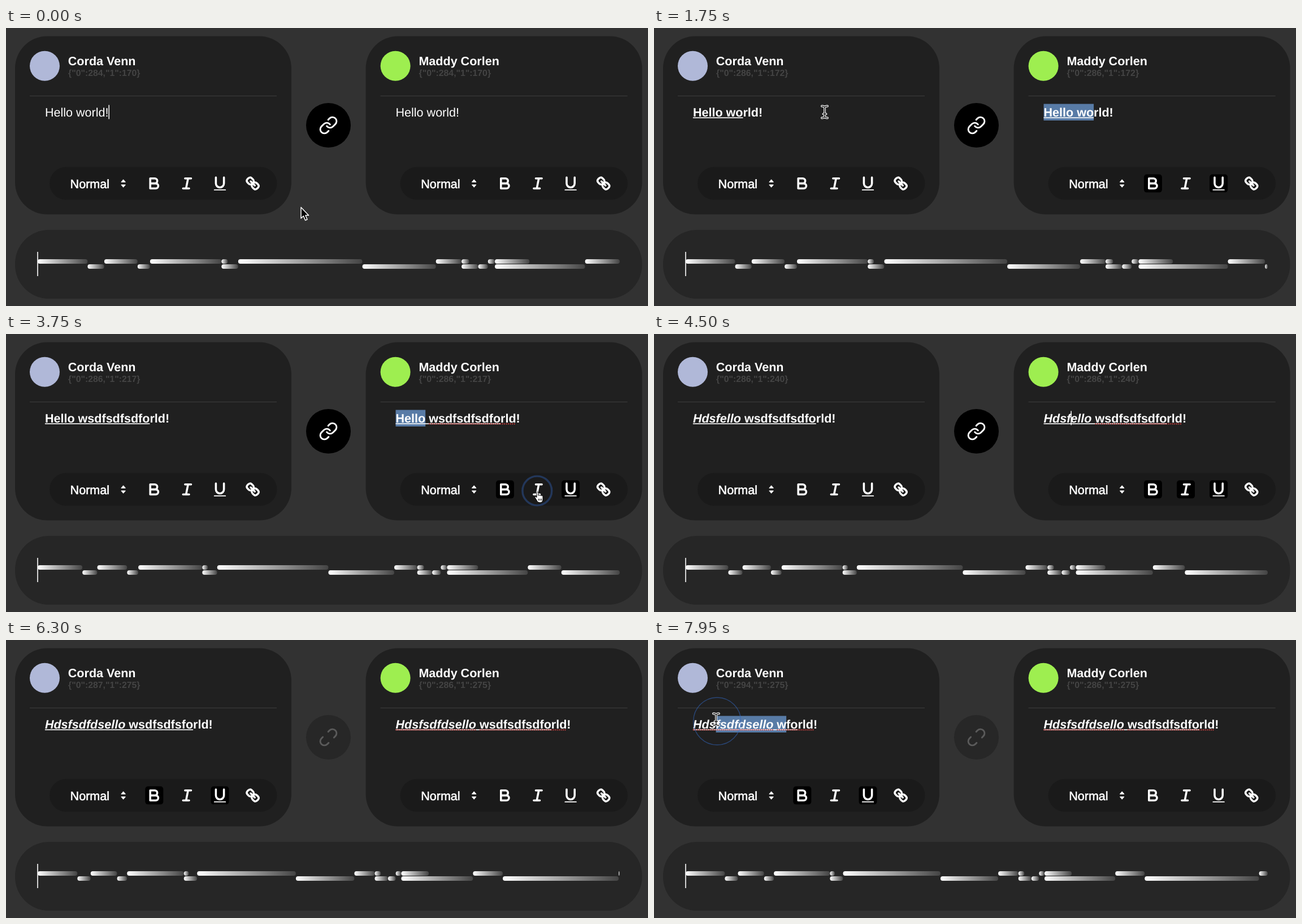
An HTML page for the animation above (8000 ms loop, 1136 by 493 pixels).

```html
<!DOCTYPE html>
<html lang="en">
<head>
<meta charset="utf-8">
<title>Linked editors</title>
<style>
  html, body { margin: 0; width: 100%; height: 100%; overflow: hidden; background: #323232; }
  svg { display: block; width: 100vw; height: 100vh; }
  text { font-family: "Liberation Sans", Arial, Helvetica, sans-serif; font-size: 21.55px; fill: #fff; text-rendering: geometricPrecision; }
  .name { font-weight: bold; }
  .clock { font-weight: bold; font-size: 15.8px; fill: #444; }
  .normal { stroke: #fff; stroke-width: .6px; }
  .icon { fill: none; stroke: #fff; stroke-width: 2; stroke-linecap: round; stroke-linejoin: round; }
  .icon .solid { fill: #fff; stroke: none; }
  .typo { stroke: #d9413f; stroke-width: 2.1; stroke-linecap: round; stroke-dasharray: 0 3.5; }
  .chain { fill: none; stroke-width: 2; stroke-linecap: round; stroke-linejoin: round; }
</style>
</head>
<body>
<svg id="stage" viewBox="0 0 1136 493">
  <defs>
    <linearGradient id="fade"><stop stop-color="#fff"/><stop offset="1" stop-color="#444"/></linearGradient>
  </defs>
  <rect width="1136" height="493" fill="#323232"/>
  <g id="editors"></g>
  <circle id="linkDisc" cx="570.5" cy="172.5" r="39.5"/>
  <g class="chain" transform="translate(570.5 172.5) scale(1.45) translate(-12 -12)">
    <path id="linked" stroke="#fff" d="M10 13a5 5 0 0 0 7.54.54l3-3a5 5 0 0 0-7.07-7.07l-1.72 1.71M14 11a5 5 0 0 0-7.54-.54l-3 3a5 5 0 0 0 7.07 7.07l1.71-1.71"/>
    <path id="unlinked" stroke="#5a5a5a" d="M18.8 12.3l1.74-1.76a5 5 0 0 0-7.07-7.07l-1.72 1.71M5.2 11.7l-1.74 1.76a5 5 0 0 0 7.07 7.07l1.72-1.71"/>
  </g>
  <rect x="16" y="358" width="1109.5" height="122" rx="60" fill="#262626"/>
  <g id="bars" fill="url(#fade)"></g>
  <rect x="55.2" y="397" width="1.6" height="43" fill="#fff"/>
  <circle id="ring" fill="none" stroke="#3267c0"/>
  <g id="cursor">
    <path id="arrow" d="M0 0V19.5L4.4 15.4 7.6 23 11 21.5 7.9 14.2H13.6Z" fill="#000" stroke="#fff" stroke-width="1.5" stroke-linejoin="round"/>
    <g id="beam" fill="none" stroke-linecap="round"></g>
    <g id="hand" stroke="#000">
      <path fill="#fff" d="M1 6.5c0-2 3-2 3 0v5c.3-1.6 2.8-1.4 2.9.2.4-1.3 2.6-1 2.7.4.6-1 2.4-.6 2.4 1v4.6c0 4-2 6.3-5 6.3-3.2 0-4.6-1.6-6-4l-3-5c-.8-1.6.9-2.6 2-1.4l1 1.3z"/>
      <path fill="none" d="M4.4 17v3.5M6.9 17v3.5M9.4 17v3.5"/>
    </g>
  </g>
</svg>
<script>
const LOOP = 8000, SIZE = 21.55, TEXT_X = 68.9, TEXT_Y = 150, RIGHT_DX = 620.6;
const MOVE = 230, PRESS = 110;
const FAMILY = '"Liberation Sans", Arial, Helvetica, sans-serif';
const LEFT = 0, RIGHT = 1;

const $ = id => document.getElementById(id);
const clamp = (v, lo, hi) => Math.min(hi, Math.max(lo, v));
const within = (v, a, b) => v >= a && v < b;
const mix = (a, b, p) => a + (b - a) * p;
const latest = (list, key, t) => list.findLast(item => item[key] <= t);
const show = (el, on) => el.setAttribute('visibility', on ? 'visible' : 'hidden');
const set = (el, attrs) => { for (const k in attrs) el.setAttribute(k, attrs[k]); };
const pen = document.createElement('canvas').getContext('2d');

// ---- Editor panels ----
const TOOLS = {
  B: '<path d="M5 4H9.5A2.5 2.5 0 0 1 9.5 9H5ZM5 9H10.5A2.5 2.5 0 0 1 10.5 14H5Z"/>',
  I: '<path d="M7 4H13M5 14H11M8 14L10 4"/>',
  U: '<path d="M5 3V9a4 4 0 0 0 8 0V3"/><rect class="solid" x="3" y="15" width="12" height="1" rx=".5"/>',
  link: '<path d="M7 7L11 11M8.9 4.577a3.476 3.476 0 0 1 .36 4.679A3.476 3.476 0 0 1 4.577 8.9C3.185 7.5 2.035 6.4 4.217 4.217S7.5 3.185 8.9 4.577ZM13.423 9.1a3.476 3.476 0 0 0-4.679-.36 3.476 3.476 0 0 0 .36 4.679c1.392 1.392 2.5 2.542 4.679.36S14.815 10.5 13.423 9.1Z"/>'
};
const toolNames = Object.keys(TOOLS);
const toolX = name => 246.3 + 58.1 * toolNames.indexOf(name);

function makeEditor(name, color, dx) {
  const g = document.createElementNS('http://www.w3.org/2000/svg', 'g');
  g.setAttribute('transform', `translate(${dx})`);
  const tools = toolNames.map(tool =>
    `<g transform="translate(${toolX(tool)} 259.6)">
      <rect class="hot" width="32" height="32" rx="5"/>
      <g class="icon" transform="scale(1.778)">${TOOLS[tool]}</g></g>`).join('');
  g.innerHTML = `
    <rect x="16" y="14.5" width="489" height="316" rx="57" fill="#202020"/>
    <circle cx="68.5" cy="67.3" r="26.5" fill="${color}"/>
    <text class="name" x="109.8" y="66">${name}</text>
    <text class="clock" x="110" y="85.3"></text>
    <rect x="42" y="120" width="437" height="1" fill="#3d3d3d"/>
    <rect x="77" y="246.5" width="402.5" height="58" rx="29" fill="#1a1a1a"/>
    <text class="normal" x="113.6" y="283.6">Normal</text>
    <path fill="#fff" stroke="#fff" stroke-linejoin="round" d="M203.8 273.2L207.6 268.8 211.4 273.2ZM203.8 278L207.6 282.4 211.4 278Z"/>
    ${tools}
    <rect class="sel" y="134.6" height="29.4" fill="#587ba6"/>
    <rect class="under" x="${TEXT_X}" y="158.4" height="1.6" fill="#fff"/>
    <text class="body" y="157"></text>
    <line class="typo" y1="159.4" y2="159.4"/><line class="typo" y1="159.4" y2="159.4"/>
    <rect class="caret" y="136.5" width="1.5" height="25" fill="#fff"/>`;
  $('editors').append(g);
  const one = c => g.querySelector('.' + c), all = c => [...g.querySelectorAll('.' + c)];
  return { dx, clock: one('clock'), hot: all('hot'), sel: one('sel'), under: one('under'),
           body: one('body'), typos: all('typo'), caret: one('caret') };
}
const editors = [makeEditor('Corda Venn', '#b0b8d8', 0), makeEditor('Maddy Corlen', '#9eee50', RIGHT_DX)];

// ---- Text: a list of { c, style }, style being letters out of B, I, U ----
function layout(doc) {
  const xs = [TEXT_X], runs = [];
  for (const { c, style } of doc) {
    let run = runs.at(-1);
    if (!run || run.style !== style) runs.push(run = { style, text: '', x: xs.at(-1) });
    run.text += c;
    pen.font = `${style.includes('I') ? 'italic ' : ''}${style.includes('B') ? 'bold ' : ''}${SIZE}px ${FAMILY}`;
    xs.push(run.x + pen.measureText(run.text).width);
  }
  return { xs, runs };
}

// ---- Session: every action adds a state; gestures move the pointer ----
// Editing turns so far, in operations: + left, - right, a pair is simultaneous
const turns = '36 -12 24 -9 51.5 4.5/-12 89.5 -53 18.5 5.5/-12 -7 5 25/-65 25'.split(' ').map(turn => {
  const sizes = turn.split('/').map(Number);
  return [Math.max(0, ...sizes), Math.max(0, ...sizes.map(n => -n))];
});
const hello = [...'Hello\u00a0world!'].map(c => ({ c, style: '' }));
let now = { t: 0, docs: [hello, hello], clocks: [[284, 170], [284, 170]], turns, linked: true,
            focus: LEFT, anchor: 12, head: 12, dragging: false, checked: [false, false], keyed: -1 };
const states = [now];
const gestures = [{ start: 0, down: 0, up: 0, from: [522, 318], to: [522, 318] }];

const commit = (t, change) => states.push(now = { ...now, t, ...change });
const setAt = (list, i, value) => list.map((old, k) => k === i ? value : old);

function gesture(t, time, from, to = from, press = true) {
  const start = Math.max(gestures.at(-1).up, t - MOVE);
  gestures.push({ start, down: t, up: t + time, from, to, press });
}
const hover = (t, x, y) => gesture(t, 0, [x, y], [x, y], false);
const textPoint = (side, i) => [layout(now.docs[side]).xs[i] + editors[side].dx, TEXT_Y];

function edit(t, change, cost, more) {
  const side = now.focus, reached = i => i === side || now.linked;
  const last = now.turns.at(-1), same = last[side] && !last[1 - side];
  const grown = [0, 0];
  grown[side] = cost + (same ? last[side] : 0);
  commit(t, {
    docs: now.docs.map((d, i) => reached(i) ? change(d) : d),
    clocks: now.clocks.map((c, i) => reached(i) ? setAt(c, side, c[side] + cost) : c),
    checked: now.checked.map((c, i) => c && (i === side || !now.linked)),
    turns: [...(same ? now.turns.slice(0, -1) : now.turns), grown],
    ...more
  });
}

function placeCaret(t, side, i) {
  gesture(t, PRESS, textPoint(side, i));
  commit(t, { focus: side, anchor: i, head: i });
}

// a high lift drags above the line, which selects back to its start
function select(t, time, side, anchor, head, lift) {
  const [x, y] = textPoint(side, head);
  gesture(t, time, textPoint(side, anchor), [x + lift * lift / 250, y - lift]);
  commit(t, { focus: side, anchor, head: anchor, dragging: true, checked: setAt(now.checked, side, true) });
  commit(t + time, { head, dragging: false });
}

function applyStyle(t, letter) {
  const { focus, anchor, head } = now;
  gesture(t, PRESS, [editors[focus].dx + toolX(letter) + 13, 275]);
  const chosen = i => within(i, Math.min(anchor, head), Math.max(anchor, head));
  edit(t + PRESS, d => d.map((ch, i) => chosen(i) ? { ...ch, style: ch.style + letter } : ch), 2);
}

// a typed letter costs one operation plus two per style it carries
function type(t, step, word) {
  [...word].forEach((c, k) => {
    const at = now.head, style = now.docs[now.focus][at - 1].style, time = t + k * step;
    edit(time, d => [...d.slice(0, at), { c, style }, ...d.slice(at)], 1 + 2 * style.length,
         { anchor: at + 1, head: at + 1, keyed: time });
  });
}

function erase(t, step, count) {
  for (let k = 0; k < count; k++) {
    const at = now.head, time = t + k * step;
    edit(time, d => [...d.slice(0, at - 1), ...d.slice(at)], 1, { anchor: at - 1, head: at - 1, keyed: time });
  }
}

function unlink(t) {
  gesture(t, PRESS, [569, 174]);
  commit(t + PRESS, { linked: false });
}

hover(130, 470, 416);
select(330, 190, LEFT, 12, 0, 70);
applyStyle(630, 'B');
select(960, 190, RIGHT, 8, 0, 57);
applyStyle(1370, 'U');
hover(1700, 302, 149);
placeCaret(2080, RIGHT, 7);
type(2230, 50, 'sdfsdfsdf');
select(3050, 200, RIGHT, 5, 0, 46);
applyStyle(3650, 'I');
placeCaret(4130, RIGHT, 1);
type(4350, 75, 'dsfsdfds');
unlink(5670);
placeCaret(5950, LEFT, 23);
erase(6120, 0, 1);
erase(6330, 40, 7);
hover(7170, 958, 160);
select(7600, 350, LEFT, 15, 3, 9);

// ---- Pointer ----
const beamPath = 'M-5-10.5Q0-10.5 0-7.5V7.5Q0 10.5-5 10.5M5-10.5Q0-10.5 0-7.5M5 10.5Q0 10.5 0 7.5M-2.5 3.5H2.5';
$('beam').innerHTML = `<path d="${beamPath}" stroke="#fff" stroke-width="3.8"/><path d="${beamPath}" stroke="#111" stroke-width="1.4"/>`;

function pointerAt(t) {
  const g = latest(gestures, 'start', t);
  const along = (a, b, p) => a.map((v, i) => mix(v, b[i], p));
  if (t < g.down) {
    const p = (t - g.start) / (g.down - g.start);
    return along(gestures[gestures.indexOf(g) - 1].to, g.from, p * p * (3 - 2 * p));
  }
  const p = g.up > g.down ? clamp((t - g.down) / (g.up - g.down), 0, 1) : 1;
  return along(g.from, g.to, p * p);
}

function drawPointer(t, s) {
  const [x, y] = pointerAt(t), lx = x > 600 ? x - RIGHT_DX : x;
  const onTool = within(y, 258, 294) && within(lx, 245, 455);
  const onLink = Math.hypot(x - 570.5, y - 172.5) < 39;
  const onText = within(y, 125, 245) && within(lx, 42, 479);
  const kind = s.dragging || onText ? 'beam' : onTool || onLink ? 'hand' : 'arrow';
  const hidden = s.keyed > latest(gestures, 'start', t).start;
  $('cursor').setAttribute('transform', `translate(${x} ${y})`);
  for (const k of ['arrow', 'beam', 'hand']) show($(k), !hidden && k === kind);

  // a ring grows on press and fades after release
  const press = latest(gestures.filter(g => g.press), 'down', t);
  show($('ring'), press);
  if (!press) return;
  const p = clamp((t - press.down) / 190, 0, 1);
  const gone = clamp((t - Math.max(press.up, press.down + 190)) / 150, 0, 1);
  set($('ring'), { cx: x + 1.8, cy: y + 3, r: mix(8, 42, p), 'stroke-width': mix(5.7, 1.4, p),
                   opacity: mix(.2, .55, p) * (1 - gone) });
}

// ---- Timeline ----
$('bars').innerHTML = '<rect height="8" rx="4"/>'.repeat(2 * turns.length + 4);

function drawBars(turns) {
  const total = turns.reduce((sum, turn) => sum + Math.max(...turn), 0), unit = 1030 / total;
  const els = $('bars').children;
  let at = 0;
  [...els].forEach((el, k) => {
    const turn = turns[k >> 1], row = k % 2;
    set(el, { x: 56 + at * unit, y: row ? 419 : 410, width: turn ? turn[row] * unit : 0 });
    if (turn && row) at += Math.max(...turn);
  });
}

// ---- One moment ----
const caretOn = (t, s) => t - s.keyed < 150 || (t - 5190 + 517 * 20) % 517 >= 240;

function drawEditor(side, t, s) {
  const ed = editors[side], doc = s.docs[side], focused = s.focus === side;
  if (ed.doc !== doc) {
    Object.assign(ed, { doc }, layout(doc));
    ed.body.innerHTML = ed.runs.map(({ x, style, text }) => `<tspan x="${x}"
      font-weight="${style.includes('B') ? 'bold' : 'normal'}"
      font-style="${style.includes('I') ? 'italic' : 'normal'}">${text}</tspan>`).join('');
  }
  const xs = ed.xs;
  const underlined = doc.findLastIndex(ch => ch.style.includes('U')) + 1;
  ed.under.setAttribute('width', xs[underlined] - TEXT_X);

  let head = s.head;
  if (focused && s.dragging) {
    const [px, py] = pointerAt(t), gap = x => Math.abs(x - px + ed.dx);
    head = py < 130 ? 0 : xs.reduce((best, x, i) => gap(x) < gap(xs[best]) ? i : best, 0);
  }
  const from = Math.min(s.anchor, head), to = Math.max(s.anchor, head);
  const typing = focused && from === to && !s.dragging;
  show(ed.sel, focused && from < to);
  show(ed.caret, typing && caretOn(t, s));
  if (focused) {
    set(ed.sel, { x: xs[from], width: xs[to] - xs[from] });
    set(ed.caret, { x: xs[head] });
  }

  // unknown words get dots, except the one being typed
  const words = [...doc.map(ch => ch.c).join('').matchAll(/[a-z]+/gi)];
  ed.typos.forEach((line, i) => {
    const [word] = words[i], a = words[i].index, b = a + word.length;
    const current = typing && head >= a && head <= b;
    show(line, s.checked[side] && !current && !/^(Hello|world)$/.test(word));
    set(line, { x1: xs[a] + 1, x2: xs[b] });
  });

  const chosen = from < to ? doc.slice(from, to) : [doc[head - 1] ?? doc[0]];
  toolNames.forEach((name, i) => show(ed.hot[i], focused && chosen.every(ch => ch.style.includes(name))));
  const [a, b] = s.clocks[side];
  ed.clock.textContent = `{"0":${a},"1":${b}}`;
}

function draw(t) {
  const s = latest(states, 't', t);
  drawEditor(LEFT, t, s);
  drawEditor(RIGHT, t, s);
  drawBars(s.turns);
  $('linkDisc').setAttribute('fill', s.linked ? '#000' : '#272727');
  show($('linked'), s.linked);
  show($('unlinked'), !s.linked);
  drawPointer(t, s);
}

let origin;
function tick(time) {
  origin ??= time;
  draw((time - origin) % LOOP);
  requestAnimationFrame(tick);
}
draw(0);
requestAnimationFrame(tick);
</script>
</body>
</html>
```
